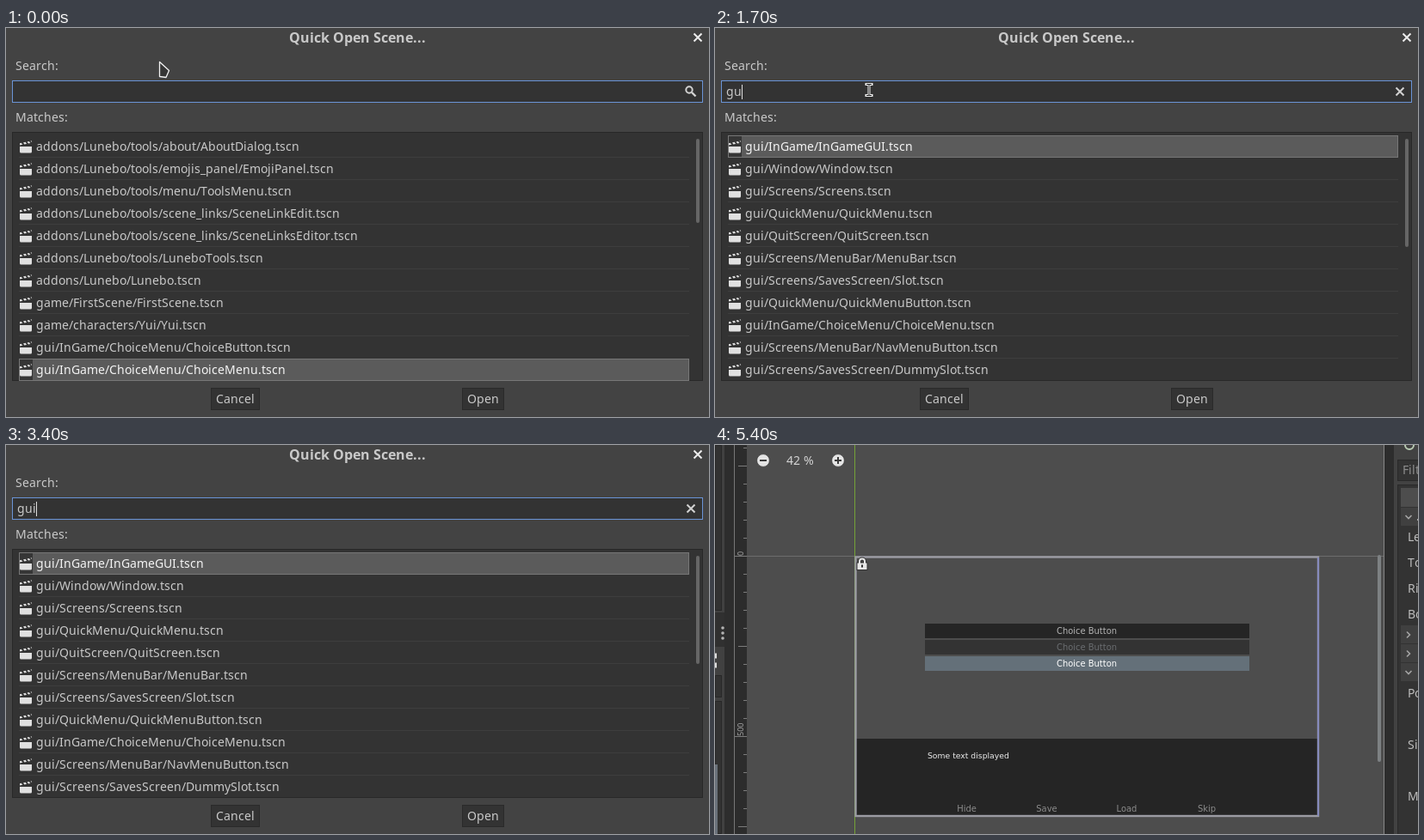
An HTML page that plays this animation: 817x453 px, repeating every 5.5 s.

```html
<!DOCTYPE html>
<html lang="en">
<head>
<meta charset="utf-8">
<title>Quick open</title>
<style>
html, body { margin: 0; width: 100%; height: 100%; overflow: hidden; background: #424242; }
svg { display: block; }
text { white-space: pre; }
</style>
</head>
<body>
<svg id="stage" width="817" height="453" viewBox="0 0 817 453"></svg>
<script>
const LOOP = 5500, STEP = 100, BLINK = 650;
const OPENED = 4400;              // dialog closes, editor shows
const KEYS = [1500, 1700, 1900];  // key presses
const QUERY = 'gui';
const UI = '"Noto Sans", sans-serif', GAME = '"DejaVu Sans", sans-serif';
const stage = document.getElementById('stage');
const pen = document.createElement('canvas').getContext('2d');

function el(tag, attrs, parent = stage) {
  const node = document.createElementNS('http://www.w3.org/2000/svg', tag);
  for (const k in attrs) node.setAttribute(k, attrs[k]);
  parent.appendChild(node);
  return node;
}
const group = (parent, attrs = {}) => el('g', attrs, parent);
const show = (node, on) => node.setAttribute('display', on ? 'inline' : 'none');

function box(g, x, y, w, h, fill, stroke) {
  const s = stroke ? 0.5 : 0;
  return el('rect', { x: x + s, y: y + s, width: w - 2 * s, height: h - 2 * s, fill, stroke: stroke || 'none' }, g);
}
function line(g, d, stroke, width = 1, extra = {}) {
  return el('path', { d, stroke, 'stroke-width': width, fill: 'none', ...extra }, g);
}

// Whole-pixel glyph advances, as the editor's own text layout uses.
function advances(str, size, weight) {
  pen.font = `${weight} ${size * 100}px ${UI}`;
  return [...str].map(c => Math.round(pen.measureText(c).width / 100));
}
function label(g, str, x, y, { size = 14, weight = 400, fill = '#c9c9c9', center = false } = {}) {
  const adv = advances(str, size, weight);
  if (center) x = Math.round(x - adv.reduce((a, b) => a + b, 0) / 2);
  const xs = adv.map(a => (x += a) - a);
  const t = el('text', { x: xs.join(' '), y, fill, 'font-family': UI, 'font-size': size, 'font-weight': weight }, g);
  t.textContent = str;
  return t;
}
function gameText(g, str, x, y, fill, size = 9.95, anchor = 'middle') {
  el('text', { x, y, fill, 'font-family': GAME, 'font-size': size, 'text-anchor': anchor }, g).textContent = str;
}

// ---- dialog ----
const dialog = group(stage);
box(dialog, 0, 0, 817, 453, '#434343');
label(dialog, 'Quick Open Scene...', 408.5, 17, { size: 16, weight: 700, center: true });
line(dialog, 'M799.5 6.5l9 9m0-9l-9 9', '#ececec', 2);
label(dialog, 'Search:', 11, 49);
label(dialog, 'Matches:', 11, 109);
box(dialog, 7, 61, 803, 26, '#333333', '#6a94d6');
box(dialog, 7, 121, 803, 290, '#333333', '#282828');

const lens = group(dialog);
el('circle', { cx: 794, cy: 72, r: 3.7, fill: 'none', stroke: '#d2d2d2', 'stroke-width': 2 }, lens);
line(lens, 'M797 75l4.5 4.5', '#d2d2d2', 2.4);
const clear = line(dialog, 'M791.5 69.5l9 9m0-9l-9 9', '#d2d2d2', 2);

for (const [name, x, w] of [['Cancel', 238, 57], ['Open', 530, 49]]) {
  box(dialog, x, 419, w, 26, '#333333', '#2a2a2a');
  label(dialog, name, x + w / 2, 437, { center: true });
}

function clapper(g, y) {
  const fill = '#e0e0e0';
  el('path', { d: `M16 ${y + 6}h14v6q0 1.5-1.5 1.5h-11q-1.5 0-1.5-1.5z`, fill }, g);
  el('path', {
    d: `M16 ${y + 2.2}l1.7-.4 1.6 2-3.3.8zM20 ${y + 1.4}l2.5-.6 1.6 2-2.6.6zM24.5 ${y + .6}l2.3-.6 1.6 2-2.4.6zM28.5 ${y - .4}l1.2-.3.5 2z`,
    fill
  }, g);
}
function matchList(rows, selected, barEnd) {
  const g = group(dialog);
  rows.forEach((name, i) => {
    const y = 125 + 26 * i, on = i === selected;
    if (on) {
      box(g, 15, y, 779, 26, '#5b5b5b', '#777777');
      box(g, 16, y + 1, 15, 24, '#363636');
    } else if (i < 10 && i + 1 !== selected) box(g, 15, y + 25, 779, 1, '#3e3e3e');
    clapper(g, y + 7);
    label(g, name + '.tscn', 35, y + 18, { fill: on ? '#f4f4f4' : '#c9c9c9' });
  });
  el('rect', { x: 802, y: 129, width: 4, height: barEnd - 129, rx: 2, fill: '#666666' }, g);
  return g;
}
const tools = 'addons/Lunebo/tools/';
const allList = matchList([
  tools + 'about/AboutDialog', tools + 'emojis_panel/EmojiPanel', tools + 'menu/ToolsMenu',
  tools + 'scene_links/SceneLinkEdit', tools + 'scene_links/SceneLinksEditor', tools + 'LuneboTools',
  'addons/Lunebo/Lunebo', 'game/FirstScene/FirstScene', 'game/characters/Yui/Yui',
  'gui/InGame/ChoiceMenu/ChoiceButton', 'gui/InGame/ChoiceMenu/ChoiceMenu'
], 10, 227);
const foundList = matchList([
  'InGame/InGameGUI', 'Window/Window', 'Screens/Screens', 'QuickMenu/QuickMenu', 'QuitScreen/QuitScreen',
  'Screens/MenuBar/MenuBar', 'Screens/SavesScreen/Slot', 'QuickMenu/QuickMenuButton',
  'InGame/ChoiceMenu/ChoiceMenu', 'Screens/MenuBar/NavMenuButton', 'Screens/SavesScreen/DummySlot'
].map(s => 'gui/' + s), 0, 255);

const typed = [...QUERY].map((_, i) => label(dialog, QUERY.slice(0, i + 1), 13, 79));
const caretX = [13];
advances(QUERY, 14, 400).forEach((a, i) => caretX.push(caretX[i] + a));
const caret = box(dialog, 13, 66, 1, 17, '#dedede');

// ---- scene editor ----
const editor = group(stage);
box(editor, 0, 0, 817, 453, '#4d4d4d');

// left dock
box(editor, 0, 0, 22, 453, '#414141');
box(editor, 0, 0, 8, 193, '#323232', '#282828');
box(editor, 11, 0, 11, 453, '#2d2d2d');
box(editor, 0, 195, 11, 40, '#303030');
for (const y of [213, 219, 225]) el('circle', { cx: 9, cy: y, r: 1.8, fill: '#b4b4b4' }, editor);
line(editor, 'M0 243.5h1v5M0 258.5h1v-5', '#e0e0e0', 2);
box(editor, 0, 268, 8, 26, '#333333', '#282828');
box(editor, 0, 298, 8, 155, '#333333', '#282828');
box(editor, 0, 372, 3, 81, '#69717a');

// ruler
box(editor, 22, 0, 15, 453, '#2c2c2c');
box(editor, 22, 0, 1, 453, '#777777');
for (let k = -6; k <= 15; k++) {
  const len = k % 10 === 0 ? 14 : k % 5 === 0 ? 10 : 4;
  box(editor, 37 - len, Math.round(129 + 21 * k), len, 1, '#7c7c7c');
}
for (const [s, y] of [['0', 129], ['500', 339]])
  el('text', { transform: `translate(33 ${y}) rotate(-90)`, fill: '#a5a5a5', 'font-family': UI, 'font-size': 9 }, editor).textContent = s;

// canvas axes and scroll bar
box(editor, 37, 129, 740, 1, '#6c6c6c');
box(editor, 162, 0, 1, 453, '#74a238');
el('rect', { x: 770, y: 128, width: 4, height: 241, rx: 2, fill: '#7d8183' }, editor);

// zoom
for (const [x, d] of [[56, 'M52 18h8'], [143, 'M139 18h8M143 14v8']]) {
  el('circle', { cx: x, cy: 18, r: 7.4, fill: '#e4e4e4', stroke: '#3a3a3a', 'stroke-width': .8 }, editor);
  line(editor, d, '#3c3c3c', 2);
}
label(editor, '42 %', 99, 23, { center: true, fill: '#d4d4d4' });

// game view
box(editor, 164, 342, 536, 89, '#252525');
el('rect', { x: 163.5, y: 130.5, width: 537.5, height: 301.5, fill: 'none', stroke: '#9b9ba3', 'stroke-width': 2.4 }, editor);
box(editor, 700, 131, 2, 301, '#868bbd');
[['#252525', '#b4b4b4'], ['#333333', '#6a6d70'], ['#647079', '#ffffff']].forEach(([bg, fg], i) => {
  box(editor, 244, 208 + 19 * i, 377, 17, bg);
  gameText(editor, 'Choice Button', 432, 220 + 19 * i, fg);
});
gameText(editor, 'Some text displayed', 247, 365, '#ededed', 9.25, 'start');
['Hide', 'Save', 'Load', 'Skip'].forEach((s, i) => gameText(editor, s, 292.5 + 93 * i, 427, '#8c8c8c'));
line(editor, 'M168 138v-2.5a3 3 0 0 1 6 0v2.5', '#333333', 4);
el('rect', { x: 165, y: 137, width: 12, height: 8.5, fill: '#e8e8e8', stroke: '#333333' }, editor);
line(editor, 'M168 138v-2.5a3 3 0 0 1 6 0v2.5', '#e8e8e8', 2);
box(editor, 170, 139.5, 2, 3, '#333333');

// right dock
box(editor, 777, 0, 1, 453, '#888888');
box(editor, 778, 0, 11, 453, '#2d2d2d');
box(editor, 789, 0, 28, 453, '#424242');
el('circle', { cx: 807, cy: 0, r: 5, fill: 'none', stroke: '#b9ccb4', 'stroke-width': 2 }, editor);
box(editor, 793, 17, 30, 25, '#333333', '#2a2a2a');
label(editor, 'Filt', 799, 34, { fill: '#8d8d8d' });
box(editor, 793, 46, 30, 410, '#333333', '#2a2a2a');
box(editor, 797, 50, 20, 22, '#4d4d4d');
for (const [y, open] of [[84, 1], [221, 0], [243, 0], [265, 1]]) {
  box(editor, 797, y - 11, 20, 21, '#404040');
  line(editor, open ? `M802.5 ${y - 2}l3.5 3.5 3.5-3.5` : `M804 ${y - 3.5}l3.5 3.5-3.5 3.5`, '#a4a4a4', 1.6);
}
label(editor, '.', 815, 88);
for (const [s, y] of [['Le', 112], ['To', 142], ['Ri', 172], ['Bo', 202], ['Po', 294], ['Si', 354], ['M', 414]])
  label(editor, s, 805, y, { fill: '#bdbdbd' });

// ---- mouse ----
const arrow = group(stage);
el('path', { d: 'M.5.5L11.5 10.5 8 18.5.5 17.5z', fill: '#363636', stroke: '#f2f2f2', 'stroke-width': 1.3, 'stroke-linejoin': 'round' }, arrow);
const beam = group(stage);
const beamPath = 'M-3-6.5H3M-3 6.5H3M0-6.5V6.5';
line(beam, beamPath, '#f2f2f2', 3, { 'stroke-linecap': 'square' });
line(beam, beamPath, '#1c1c1c', 1);

// [time, x, y]
const intro = [[0, 178, 39], [400, 173, 51], [900, 179, 72], [2600, 179, 72]];
const outro = [[3900, 418, 462], [4200, 424, 428], [4600, 386, 335], [4900, 386, 335], [5300, 400, 470]];

function along(path, t) {
  const i = path.findIndex(p => p[0] > t);
  if (i < 1) return null;
  const [t0, x0, y0] = path[i - 1], [t1, x1, y1] = path[i];
  const k = (t - t0) / (t1 - t0);
  return [Math.round(x0 + (x1 - x0) * k), Math.round(y0 + (y1 - y0) * k)];
}

function render(ms) {
  const t = Math.floor((ms % LOOP) / STEP) * STEP;
  const n = KEYS.filter(k => t >= k).length;
  const opened = t >= OPENED;
  show(dialog, !opened);
  show(editor, opened);
  show(allList, n === 0);
  show(foundList, n > 0);
  show(lens, n === 0);
  show(clear, n > 0);
  typed.forEach((node, i) => show(node, i === n - 1));

  const since = t - (n ? KEYS[n - 1] : 700);
  caret.setAttribute('x', caretX[n]);
  show(caret, since >= 0 && Math.floor(since / BLINK) % 2 === 0);

  const pos = along(intro, t) || along(outro, t);
  const inField = !!pos && !opened && pos[1] >= 61 && pos[1] < 87;
  show(beam, inField);
  show(arrow, !!pos && !inField);
  if (pos) (inField ? beam : arrow).setAttribute('transform', `translate(${pos})`);
}

const start = performance.now();
function tick() {
  render(performance.now() - start);
  requestAnimationFrame(tick);
}
tick();
</script>
</body>
</html>
```
